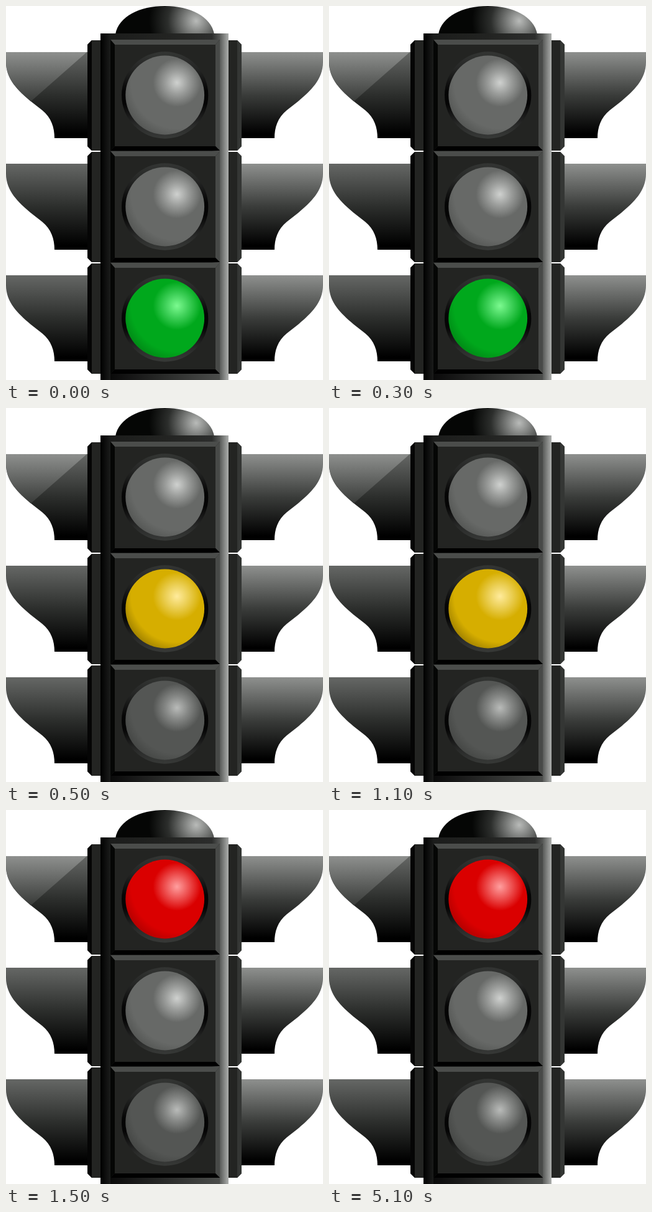
Write an HTML page that moves like this. It is 510 px wide and 600 px high and loops after 7500 ms.

```html
<!DOCTYPE html>
<html lang="en">
<head>
<meta charset="utf-8">
<title>Traffic light</title>
<style>
  html, body { margin: 0; width: 100%; height: 100%; overflow: hidden; background: #fff; }
  svg { display: block; width: 100%; height: 100%; }
</style>
</head>
<body>
<svg id="stage" viewBox="0 0 510 600"></svg>
<script>
const stage = document.getElementById('stage');
const LOOP = 7500, STEP = 179;

// highlight, inner glow, base, shaded rim
const PAINTS = {
  grey: ['#cfd1cf', '#9b9d9b', '#676967', '#555755'],
  dim: ['#b9bbb9', '#868886', '#545654', '#454745'],
  red: ['#ff9f9f', '#ee5454', '#da0000', '#b40000'],
  yellow: ['#ffeb9c', '#ebcf55', '#d6ae00', '#a18200'],
  green: ['#7cfa90', '#40d15a', '#00a81c', '#008a16']
};

const stops = list => list.map(([at, color]) => `<stop offset="${at}" stop-color="${color}"/>`).join('');
const linear = (id, list, axis = 'x2="0" y2="1"') =>
  `<linearGradient id="${id}" ${axis}>${stops(list)}</linearGradient>`;
const radial = (id, x, y, r, list) =>
  `<radialGradient id="${id}" gradientUnits="userSpaceOnUse" cx="${x}" cy="${y}" r="${r}">${stops(list)}</radialGradient>`;
const shape = (d, fill) => `<path d="${d}" fill="${fill}"/>`;

const lampPaint = ([light, glow, base, rim], id) =>
  radial(id, 275, 123, 92, [[0, light], [.2, glow], [.42, base], [.8, base], [1, rim]]);

const defs = `<defs>
  ${linear('leftVisor', [[0, '#656765'], [.5, '#2c2e2c'], [.95, '#000']])}
  ${linear('rightVisor', [[0, '#8e908e'], [.5, '#3a3c3a'], [.95, '#000']])}
  ${linear('shine', [[0, '#8e908e'], [1, '#383a38']])}
  ${linear('body', [[0, '#000'], [.08, '#1c1d1c'], [.5, '#222321'], [.87, '#2c2d2c'], [.93, '#555755'], [1, '#adafad']], '')}
  ${linear('foot', [[0, '#0a0a0a'], [.5, '#2a2b2a'], [1, '#4b4d4b']], '')}
  ${linear('ring', [[0, '#333533'], [.2, '#252625'], [.45, '#050505'], [.6, '#050505'], [.85, '#2a2b2a'], [1, '#373937']])}
  ${radial('dome', 306, 24, 76, [[0, '#b9bbb9'], [.25, '#7e807e'], [.6, '#2c2e2c'], [1, '#050605']])}
  ${Object.entries(PAINTS).map(([name, paint]) => lampPaint(paint, name)).join('')}
</defs>`;

const VISOR = 'M0 74H132V212H78C78 195 73 179 58 167L40 153C20 136 0 118 0 90Z';

function sides(i) {
  return `<g transform="translate(0 ${i * STEP})">
    ${shape(VISOR, 'url(#leftVisor)')}
    ${i ? '' : shape('M0 74H130L40 153C20 136 0 118 0 90Z', 'url(#shine)')}
    <g transform="translate(510) scale(-1 1)">${shape(VISOR, 'url(#rightVisor)')}</g>
    ${shape('M138 55H153V232H138L131 225V62Z', '#232422')}
    ${shape('M138 55V232L131 225V62Z', '#050505')}
    ${shape('M357 55H372L379 62V225L372 232H357Z', '#232422')}
    ${shape('M372 55L379 62V225L372 232Z', '#343634')}
  </g>`;
}

function panel(i) {
  return `<g transform="translate(0 ${i * STEP})">
    ${shape('M168 54H344V232H168Z', '#232422')}
    ${shape('M168 54H344L337 62H175Z', '#4b4d4b')}
    ${shape('M344 54V232L337 225V62Z', '#484a48')}
    ${shape('M168 54L175 62V225L168 232Z', '#050605')}
    ${shape('M168 232L175 225H337L344 232Z', '#000')}
    <circle cx="255.7" cy="143" r="69.7" fill="url(#ring)"/>
    <circle class="lamp" cx="255.7" cy="143" r="63.4"/>
  </g>`;
}

const rows = [0, 1, 2];
stage.innerHTML = defs + rows.map(sides).join('') +
  shape('M176 45C181 17 215 0 255.5 0S330 17 335 45Z', 'url(#dome)') +
  shape('M152 44H358V600H152Z', 'url(#body)') +
  shape('M168 590H344V600H168Z', 'url(#foot)') +
  rows.map(panel).join('');

const lamps = [...stage.querySelectorAll('.lamp')];

function draw(t) {
  const lit = t < 500 ? 2 : t < 1500 ? 1 : 0;
  lamps.forEach((lamp, i) => {
    const paint = i === lit ? ['red', 'yellow', 'green'][i] : i === 2 ? 'dim' : 'grey';
    lamp.setAttribute('fill', `url(#${paint})`);
  });
}

const start = performance.now();
function tick() {
  draw((performance.now() - start) % LOOP);
  requestAnimationFrame(tick);
}
tick();
</script>
</body>
</html>
```
